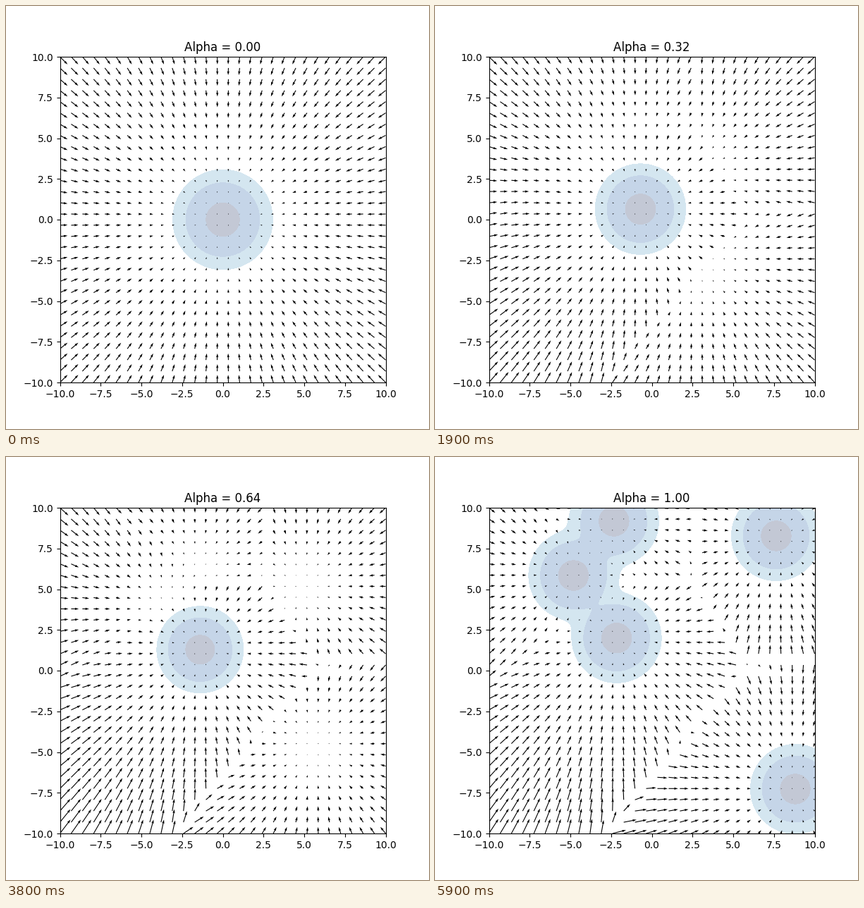
These frames come from a looping animation (600 px wide and 600 px high, 6000 ms). A matplotlib script:

```python
import numpy as np
import matplotlib.pyplot as plt
from matplotlib.animation import FuncAnimation

FRAMES = 60
LIMIT = 10
MEANS = np.array([(-2.16, 2.0), (-4.81, 5.84), (-2.32, 9.18),
                  (7.64, 8.27), (8.81, -7.27)])
BANDS = ["#d4e6f0", "#c5d5e8", "#c3c8d5"]
# Depth of each band edge below the peak, as a share of peak minus floor
DEPTHS = np.array([0.577, 0.313, 0.064])
LOG_FLOOR = -10
LOG_NORM = -np.log(2 * np.pi)


def grid(n):
    axis = np.linspace(-LIMIT, LIMIT, n)
    return np.stack(np.meshgrid(axis, axis), axis=-1)


def mixture(points):
    """Log density and score of the equally weighted unit Gaussians."""
    offsets = MEANS - points[..., None, :]
    logs = -0.5 * (offsets ** 2).sum(-1)
    top = logs.max(-1, keepdims=True)
    weights = np.exp(logs - top)
    total = weights.sum(-1, keepdims=True)
    log_p = (top + np.log(total))[..., 0] + LOG_NORM - np.log(len(MEANS))
    score = ((weights / total)[..., None] * offsets).sum(-2)
    return log_p, score


coarse, fine = grid(30), grid(240)
end_score = mixture(coarse)[1]
end_log = mixture(fine)[0]
start_score = -coarse
start_log = LOG_NORM - 0.5 * (fine ** 2).sum(-1)

fig, ax = plt.subplots(figsize=(6, 6), dpi=100)
ax.set_aspect("equal")
ax.set(xlim=(-LIMIT, LIMIT), ylim=(-LIMIT, LIMIT))
ticks = np.arange(-LIMIT, LIMIT + 1, 2.5)
ax.set_xticks(ticks)
ax.set_yticks(ticks)
title = ax.set_title("")
artists = []


def draw(i):
    while artists:
        artists.pop().remove()
    alpha = i / (FRAMES - 1)
    title.set_text(f"Alpha = {alpha:.2f}")

    log_p = (1 - alpha) * start_log + alpha * end_log
    peak = log_p.max()
    levels = [*(peak - DEPTHS * (peak - LOG_FLOOR)), peak + 1]
    artists.append(ax.contourf(fine[..., 0], fine[..., 1], log_p,
                               levels=levels, colors=BANDS, zorder=0.5))

    # A fresh quiver rescales its arrows to the current field
    score = (1 - alpha) * start_score + alpha * end_score
    artists.append(ax.quiver(coarse[..., 0], coarse[..., 1],
                             score[..., 0], score[..., 1]))
    ax.set(xlim=(-LIMIT, LIMIT), ylim=(-LIMIT, LIMIT))
    return artists


anim = FuncAnimation(fig, draw, frames=FRAMES, interval=100,
                     init_func=lambda: draw(0), repeat=True, repeat_delay=0)
plt.show()
```
